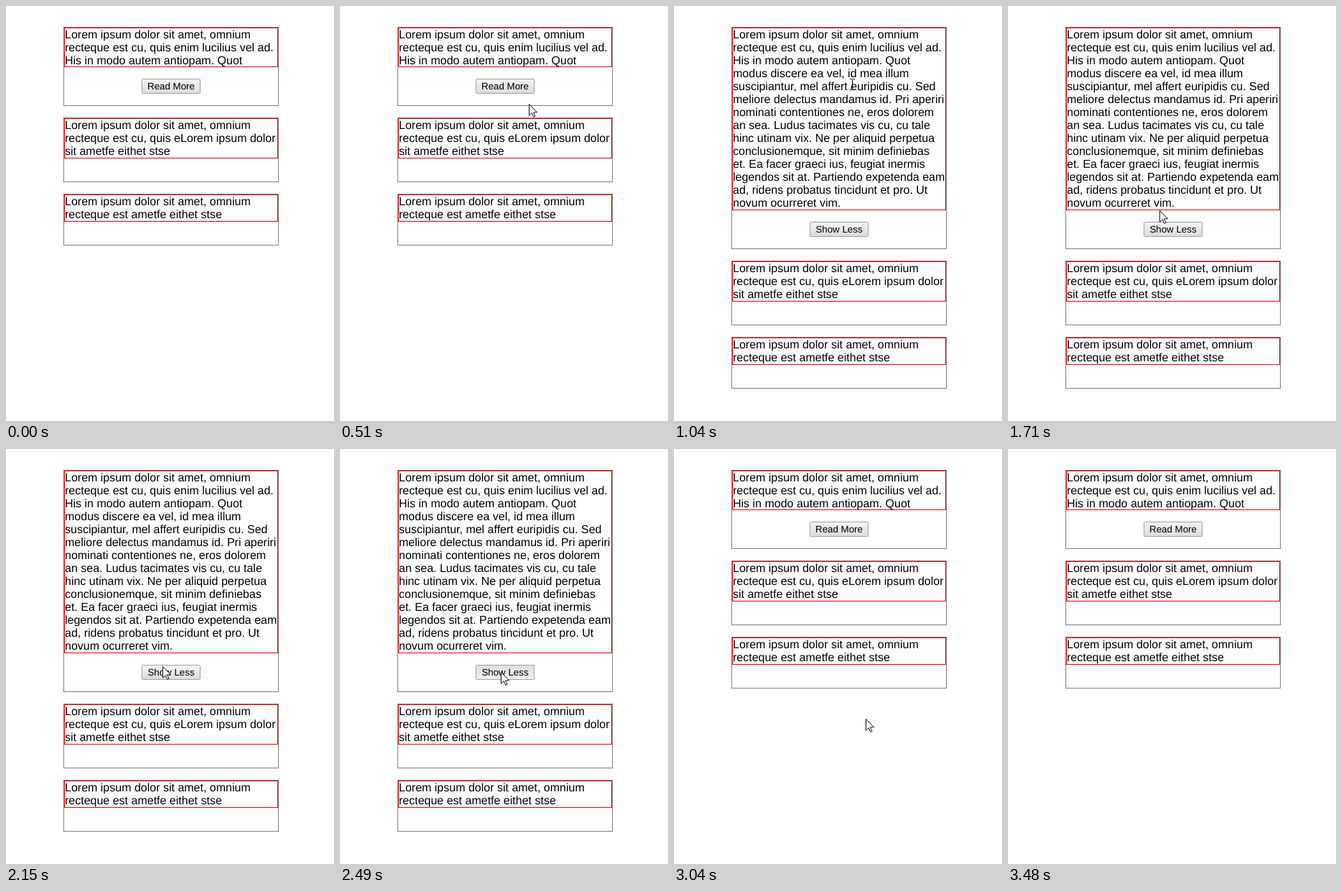
An HTML page that plays this animation: 457 px wide and 577 px high, repeating every 4140 ms.

```html
<!DOCTYPE html>
<html lang="en">
<head>
<meta charset="utf-8">
<title>Read more</title>
<style>
  html, body { margin: 0; width: 100%; height: 100%; overflow: hidden; background: #fff; }
  svg { display: block; width: 457px; height: 577px; }
  text {
    font: 16px "Liberation Sans", Arial, sans-serif;
    white-space: pre;
    text-rendering: geometricPrecision;
  }
  .label { font-size: 13.333px; text-anchor: middle; }
  .card { fill: #fff; stroke: #808080; }
  .copy { fill: none; stroke: #f00; }
</style>
</head>
<body>
<svg id="stage" viewBox="0 0 457 577" xmlns="http://www.w3.org/2000/svg">
  <defs>
    <linearGradient id="idle" x2="0" y2="1">
      <stop offset="0" stop-color="#f4f4f4"/><stop offset="1" stop-color="#dcdcdc"/>
    </linearGradient>
    <linearGradient id="down" x2="0" y2="1">
      <stop offset="0" stop-color="#dedede"/><stop offset="1" stop-color="#f2f4f4"/>
    </linearGradient>
  </defs>
</svg>
<script>
const LOOP = 4140, OPEN = 1040, PRESS = 2490, CLOSE = 2590, STEP = 110;
const LINE = 18, LEFT = 80, WIDTH = 300, GAP = 16;

const texts = [
  `Lorem ipsum dolor sit amet, omnium
recteque est cu, quis enim lucilius vel ad.
His in modo autem antiopam. Quot
modus discere ea vel, id mea illum
suscipiantur, mel affert euripidis cu. Sed
meliore delectus mandamus id. Pri aperiri
nominati contentiones ne, eros dolorem
an sea. Ludus tacimates vis cu, cu tale
hinc utinam vix. Ne per aliquid perpetua
conclusionemque, sit minim definiebas
et. Ea facer graeci ius, feugiat inermis
legendos sit at. Partiendo expetenda eam
ad, ridens probatus tincidunt et pro. Ut
novum ocurreret vim.`,
  `Lorem ipsum dolor sit amet, omnium
recteque est cu, quis eLorem ipsum dolor
sit ametfe eithet stse`,
  `Lorem ipsum dolor sit amet, omnium
recteque est ametfe eithet stse`
];

// The pointer comes in, opens the card, goes to its button, closes it and leaves.
const easeOut = k => 1 - (1 - k) ** 3;
const easeInOut = k => k * k * (3 - 2 * k);
const entry = { x: 503, y: 524 };
const moves = [
  { start: 290, end: 730, x: 247, y: 109, ease: easeOut },
  { start: 1370, end: 1930, x: 210, y: 291, ease: easeOut },
  { start: 2150, end: 2490, x: 224, y: 310, ease: easeOut },
  { start: 2830, end: 3360, x: 391, y: 559, ease: easeInOut }
];
const GONE = 3480;

const stage = document.getElementById("stage");

function set(el, attrs) {
  for (const key in attrs) el.setAttribute(key, attrs[key]);
}

function add(parent, tag, attrs, text) {
  const el = document.createElementNS(stage.namespaceURI, tag);
  set(el, attrs);
  if (text) el.textContent = text;
  return parent.appendChild(el);
}

function box(parent, cls, inset) {
  return add(parent, "rect", {
    class: cls, x: LEFT + inset + .5, y: inset + .5, width: WIDTH - 2 * inset - 1
  });
}

function show(el, on) {
  set(el, { visibility: on ? "visible" : "hidden" });
}

const cards = texts.map(text => {
  const g = add(stage, "g", {});
  const frame = box(g, "card", 0);
  const copy = box(g, "copy", 1);
  const rows = text.split("\n").map((line, i) =>
    add(g, "text", { x: LEFT + 2, y: 16 + i * LINE }, line));
  return { g, frame, copy, rows };
});

const button = add(stage, "g", {});
const face = add(button, "rect", { x: 189.5, y: .5, width: 81, height: 20, rx: 1, stroke: "#a2a2a2" });
const label = add(button, "text", { class: "label", x: 230, y: 15 });

const arrow = add(stage, "path", {
  d: "M.5 .5V16.2L4.3 12.7L6.8 18.4L9 17.4L6.5 11.8H11.6Z", fill: "#fff", stroke: "#1a1426"
});
const beam = add(stage, "path", {
  d: "M-2 -7.5H1M2 -7.5H5M1.5 -7V7M-2 7.5H1M2 7.5H5", fill: "none", stroke: "#000"
});

// Places the cards below each other and returns the span of each text area.
function layout(open) {
  let y = 29;
  return cards.map((card, i) => {
    const folds = i === 0;
    const folded = folds && !open;
    const shown = folded ? 3 : card.rows.length;
    const inner = folded ? 55 : shown * LINE + 2;
    const height = inner + (folds ? 55 : 34);
    const top = y + 1;
    set(card.g, { transform: `translate(0 ${y})` });
    set(card.frame, { height: height - 1 });
    set(card.copy, { height: inner - 1 });
    card.rows.forEach((row, n) => show(row, n < shown));
    if (folds) set(button, { transform: `translate(0 ${top + inner + GAP})` });
    y += height + GAP;
    return { top, bottom: top + inner };
  });
}

// Each move advances in even time steps and rests at its end.
function pointer(t) {
  let at = entry;
  for (const { start, end, x, y, ease } of moves) {
    if (t < start) break;
    const steps = Math.round((end - start) / STEP);
    const done = Math.min(Math.floor((t - start) / (end - start) * steps), steps);
    const k = ease((done + 1) / (steps + 1));
    at = { x: Math.round(at.x + (x - at.x) * k), y: Math.round(at.y + (y - at.y) * k) };
  }
  return at;
}

function draw(t) {
  const open = t >= OPEN && t < CLOSE;
  const areas = layout(open);
  label.textContent = open ? "Show Less" : "Read More";
  set(face, { fill: t >= PRESS && t < CLOSE ? "url(#down)" : "url(#idle)" });

  const { x, y } = pointer(t);
  const present = t >= moves[0].start && t < GONE;
  const overText = x > LEFT && x < LEFT + WIDTH && areas.some(a => y >= a.top && y < a.bottom);
  for (const el of [arrow, beam]) {
    set(el, { transform: `translate(${x} ${y})` });
    show(el, present && overText === (el === beam));
  }
}

const start = performance.now();
function tick() {
  draw((performance.now() - start) % LOOP);
  requestAnimationFrame(tick);
}
tick();
</script>
</body>
</html>
```
